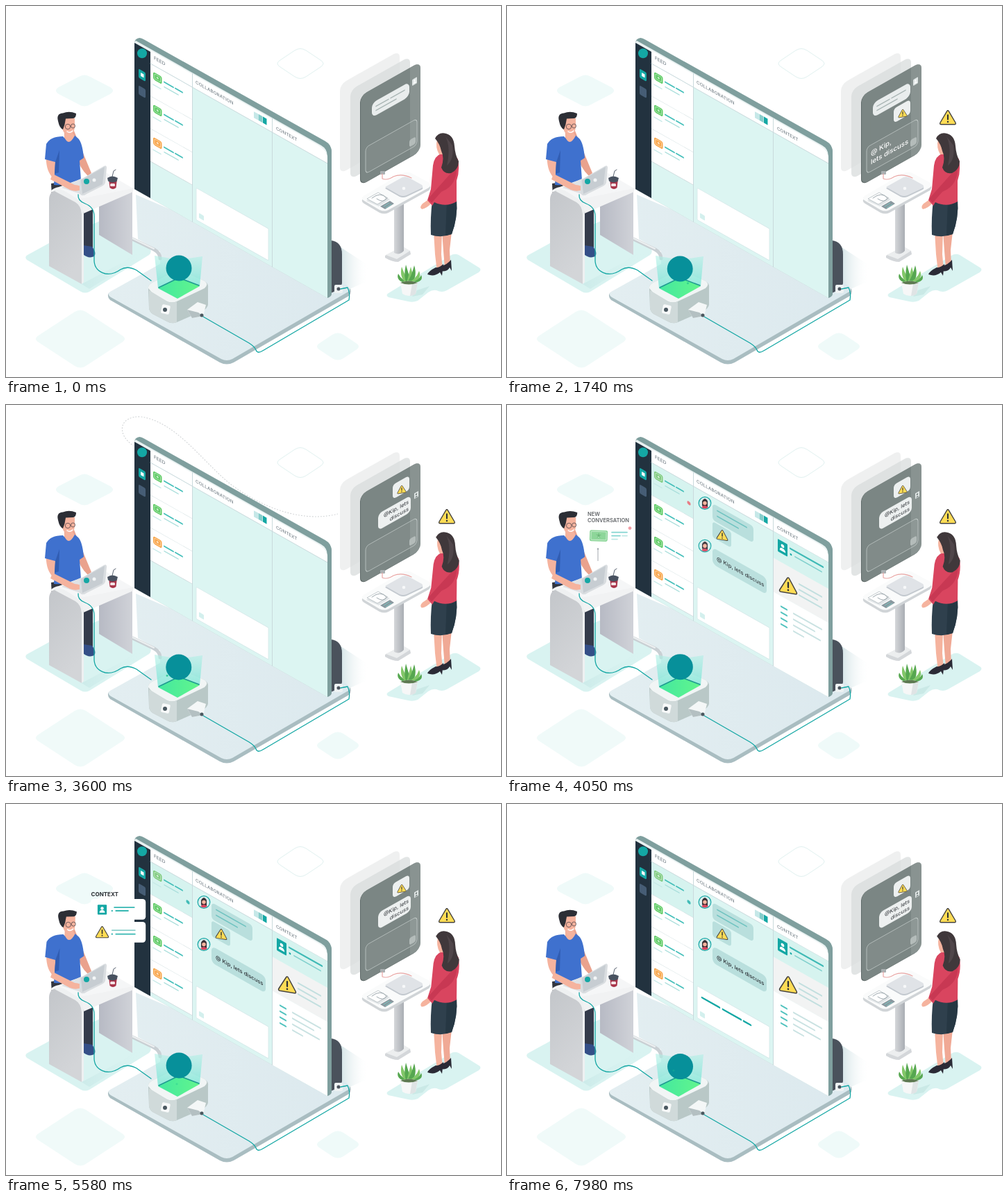
An HTML page that plays this animation: 713x535 px, repeating every 8 s.

```html
<!DOCTYPE html>
<html lang="en">
<head>
<meta charset="utf-8">
<title>Shared conversation</title>
<style>
html, body { margin: 0; width: 100%; height: 100%; overflow: hidden; background: #fff; }
svg { display: block; width: 100%; height: 100%; font-family: Inter, sans-serif; }
</style>
</head>
<body>
<svg id="stage" viewBox="0 0 713 535"></svg>
<script>
const DURATION = 8000;
const SLOPE = .565;
const TEAL = '#14a7a4', INK = '#2b2f34', SKIN = '#f5b39e';
const TRAIL = 'M478 157C430 170 370 150 322 113C280 78 245 25 195 17C163 15 158 42 184 59';

// Markup helpers
const path = (d, fill, extra = '') => `<path d="${d}" fill="${fill}" ${extra}/>`;
const line = (d, stroke, width, extra = '') =>
  `<path d="${d}" fill="none" stroke="${stroke}" stroke-width="${width}" stroke-linecap="round" stroke-linejoin="round" ${extra}/>`;
const rect = (x, y, w, h, fill, r = 0, extra = '') =>
  `<rect x="${x}" y="${y}" width="${w}" height="${h}" rx="${r}" fill="${fill}" ${extra}/>`;
const circle = (x, y, r, fill, extra = '') => `<circle cx="${x}" cy="${y}" r="${r}" fill="${fill}" ${extra}/>`;
const text = (x, y, size, fill, content, extra = '') =>
  `<text x="${x}" y="${y}" font-size="${size}" fill="${fill}" ${extra}>${content}</text>`;
const group = (id, content, extra = '') => `<g id="${id}" ${extra}>${content}</g>`;
const bar = (x, y, w, color = '#54c5c0', width = 2) => line(`M${x} ${y}h${w}`, color, width);
const gradient = (id, from, to, dir = 'x2="1" y2="0"') =>
  `<linearGradient id="${id}" ${dir}><stop stop-color="${from}"/><stop offset="1" stop-color="${to}"/></linearGradient>`;
const plane = (x, y, slope) => `transform="matrix(1 ${slope} 0 1 ${x} ${y})"`;

// "lean" counters part of the slope of the surface the sign lies on
const warning = (x, y, s = 1, lean = 0) => `<g transform="translate(${x} ${y}) scale(${s}) matrix(1 ${lean} 0 1 0 0)">
  <path d="M-1.4-9.2Q0-11.2 1.4-9.2L11 7.2Q12 9.6 9.6 9.8H-9.6Q-12 9.6-11 7.2Z" fill="#ffdc55" stroke="#45433f" stroke-width="1.4"/>
  ${line('M0-3.8V2.5', INK, 2)}${circle(0, 6, 1.2, INK)}</g>`;

const person = (x, y, w, h, fill = TEAL) => rect(x, y, w, h, fill, 1) +
  circle(x + w / 2, y + h * .36, w * .17, '#fff') +
  path(`M${x + w * .2} ${y + h * .8}q0 ${-h * .25} ${w * .3} ${-h * .25}t${w * .3} ${h * .25}z`, '#fff');

const portrait = (x, y) => `<g ${plane(x, y, -SLOPE)}>` +
  circle(0, 0, 8.8, '#d9eeee', `stroke="${TEAL}" stroke-width="1.2"`) +
  path('M-4 4v-7q4-7 8 0v9z', '#3a3035') + circle(0, 0, 2.8, SKIN) + path('M-5 6q5-5 10 0q-5 4-10 0', '#d9455f') + '</g>';

const note = (x, y, w, h, color) => rect(x, y, w, h, color, 2.5) +
  rect(x + 2, y + 2, w - 4, h - 4, 'none', 1, 'stroke="#ffffffa0" stroke-width=".8"') +
  circle(x + w / 2, y + h / 2, h * .14, '#ffffffa0');

const feedItem = (v, color, fill) => rect(23, v, 60.5, 47, fill) +
  line(`M23 ${v + 47}h60.5`, '#ccd9db', .8) + note(27, v + 9.5, 12.5, 11, color) +
  bar(43, v + 15.5, 13, '#45bfba', 2) + bar(59, v + 15.5, 10, '#45bfba', 2) +
  bar(27, v + 28, 11, '#c6e9e7', 1.5) + bar(43, v + 22.5, 20, '#a9dedb', 1.5);

const diamond = (cx, cy, w, h, fill, extra = '') => {
  const x = w / 2 - 8, y = h / 2 - 5;
  return path(`M${cx - x} ${cy - 5}L${cx - 8} ${cy - y}Q${cx} ${cy - h / 2} ${cx + 8} ${cy - y}L${cx + x} ${cy - 5}Q${cx + w / 2} ${cy} ${cx + x} ${cy + 5}L${cx + 8} ${cy + y}Q${cx} ${cy + h / 2} ${cx - 8} ${cy + y}L${cx - x} ${cy + 5}Q${cx - w / 2} ${cy} ${cx - x} ${cy - 5}Z`, fill, extra);
};

const defs = `<defs>
  ${gradient('legFront', '#c3c6ca', '#d3d5d8', 'x2=".4" y2="1"')}
  ${gradient('legBack', '#b7bac4', '#d0d2d8')}
  ${gradient('floor', '#e3eef1', '#dce9ee')}
  ${gradient('shade', '#a9c9ce', '#ffffff00')}
  ${gradient('deskShade', '#bfe3e2', '#d9f3f100')}
  ${gradient('beam', '#b4efe699', '#5fe3cfaa', 'x2="0" y2="1"')}
  ${gradient('glow', '#43e8a0', '#62f58c')}
  ${gradient('column', '#d5d7da', '#a9adb3')}
  <clipPath id="feedClip"><rect x="23" y="20" width="60.5" height="194"/></clipPath>
  <clipPath id="tabletClip"><rect width="86" height="129" rx="9"/></clipPath>
  <mask id="trail" maskUnits="userSpaceOnUse" x="0" y="0" width="713" height="535">
    <path id="trailReveal" d="${TRAIL}" pathLength="1" stroke="#fff" stroke-width="6" fill="none" stroke-dasharray="1 2"/>
  </mask>
</defs>`;

const ground = diamond(113, 122, 90, 50, '#effaf9') + diamond(107, 480, 136, 88, '#f0faf9') +
  diamond(478, 491, 68, 44, '#effaf9') + diamond(424, 83, 74, 48, 'none', 'stroke="#e0f1f0" stroke-width="1"') +
  path('M31 359L62 342L140 308L207 350Q211 354 206 359L120 412Q114 415 108 412L30 366Q26 362 31 359Z', '#d9f3f1') +
  path('M551 414L640 360Q646 356 652 359L681 377Q686 380 681 384L635 410Q628 414 620 410Q614 409 608 413L593 425Q586 428 579 426L551 420Q546 417 551 414Z', '#d9f3f1') +
  path('M470 340L522 374L518 398L484 413Z', 'url(#shade)', 'opacity=".85"');

const platform = path('M148 414Q145 419 150 424L308 514Q318 519 328 514L494 418Q498 414 496 408L470 395L350 330L230 368Z', '#a9bdc1') +
  path('M150 412Q145 416 151 420L310 509Q318 513 326 509L493 412Q498 408 490 402L187 272L190 336L222 354V372Z', 'url(#floor)') +
  line('M182 336L213 351Q222 356 222 364', '#c9d0d4', 5) + line('M182 335L213 350', '#eceff0', 2);

const screen = path('M468 338Q484 340 484 358V400Q483 408 468 414Z', '#4a525c') +
  path('M185 54Q185 47 192 46Q195 46 200 49L460 195Q469 200 469 210V415Q469 419 463 421L185 264Z', '#7f9f9e') +
  path('M185 52L187 50L454 201Q463 206 463 216V421L185 264Z', '#eaf2f2') +
  group('screen',
    rect(0, 3, 23, 211, '#22323f') + `<g ${plane(11, 12, -SLOPE)}>${circle(0, 0, 7, TEAL)}</g>` +
    rect(6, 37, 10, 13, TEAL, 2) + rect(9, 41, 4.5, 5, '#fff', .5) + rect(6, 61, 10, 13, '#465d75', 2) +
    rect(23, 1, 241, 19, '#fff') + path('M264 1q14 0 14 12v7h-14z', '#fff') +
    rect(23, 20, 255, 194, '#dcf5f2') +
    '<g clip-path="url(#feedClip)">' +
      group('feed', feedItem(-27, '#7fcb7f', '#d6f3ef') + feedItem(20, '#5fcb65', '#fff') +
        feedItem(67, '#5fcb65', '#fff') + feedItem(114, '#f8a64b', '#fff') + circle(77, 1, 2.6, TEAL, 'id="unread"')) + '</g>' +
    line('M23 20H278M83.5 0V214M198.5 0V214', '#c9d9dc', 1) +
    text(28, 11, 6.5, '#7a858c', 'FEED', 'font-weight="500"') +
    text(88, 12, 6.3, '#7a858c', 'COLLABORATION', 'font-weight="500" letter-spacing=".1"') +
    text(204, 13, 6.3, '#7a858c', 'CONTEXT', 'font-weight="500"') +
    rect(172, 5, 6, 9, '#c6e8e8') + rect(178.5, 5, 6, 9, '#85ccca') + rect(185, 5, 5.5, 9, TEAL) +
    rect(89, 162, 104, 46, '#fff', 1, 'stroke="#d4e8e9" stroke-width=".8"') + rect(93, 196, 7, 7, '#d4f0ee', 1) +
    group('reply', '') +
    group('firstMessage', portrait(100, 35) + rect(111, 29, 59, 24, '#b9dfdd', 5) + bar(118, 36, 42, '#6fc3c0', 1.8) + bar(118, 44, 30, '#6fc3c0', 1.8) +
      rect(111, 55, 27, 23, '#b9dfdd', 4) + warning(125, 67, .7, -.4)) +
    group('secondMessage', portrait(100, 96) + rect(111, 92, 78, 24, '#b9dfdd', 6) +
      text(117, 107, 7.6, INK, '@ Kip, lets discuss', 'font-weight="500"')) +
    group('details', rect(199, 20, 79, 38, '#d6f3ef') + rect(199, 58, 79, 49, '#f2f3f3') + rect(199, 107, 79, 107, '#fff') +
      person(205, 27, 14, 18) + bar(223, 31, 47, '#3fbab6', 2.4) + circle(224, 39, 1.4, TEAL) + bar(230, 39, 38, '#80d0cd', 1.8) +
      warning(220, 86, 1.1, -.4) + bar(236, 75, 32, '#c2dfdf', 2.2) + bar(236, 83, 26, '#c2dfdf', 2.2) + bar(236, 91, 32, '#c2dfdf', 2.2) +
      [0, 1, 2, 3].map(i => bar(210, 122 + i * 8.5, 8, '#50c2be', 2.2) + bar(228, 122 + i * 8.5, [40, 30, 38, 14][i], '#c9e2e2', 2.2)).join('')),
    plane(185, 50, SLOPE)) +
  path('M463 216Q463 206 455 201L460 197Q469 203 469 210V415L463 421Z', '#7f9f9e');

const device = path('M205 407Q204 402 212 398L242 383Q249 380 256 383L285 396Q292 400 291 406V431Q290 436 283 440L246 456Q239 459 232 455L211 444Q206 440 206 435Z', '#b9c8c7') +
  path('M205 407Q204 402 212 398L242 383Q249 380 256 383L285 396Q293 401 286 407L246 426Q239 429 232 426L210 413Z', '#f1f5f5') +
  path('M206 410L232 426Q239 429 246 426V456Q239 459 232 455L211 444Q206 440 206 435Z', '#d0dada') +
  path('M219 407L249 391L279 404L247 422Z', 'url(#glow)') +
  path('M214 360L249 366L283 361L279 404L249 392L219 407Z', 'url(#beam)') +
  line('M220 406L249 392L278 403', '#1d9a90', 1.5) + line('M249 367V392', '#81d9cd', .7) +
  circle(249, 378, 18.5, '#07909a', 'id="token"') + circle(0, 0, 1.5, '#25c890', 'id="spark"') +
  rect(224, 431, 12, 13, '#f7f9f9', 2, 'transform="rotate(12 230 437)"') + circle(229, 438, 3, '#4a5860') +
  path('M261 438L276 427L288 431L284 447L268 450Z', '#f4f7f7') + path('M261 438L277 442L284 447L268 450Z', '#b4c0c2') + circle(282, 446, 2.5, '#4c5960');

const cables = rect(473, 402, 12, 12, '#eef2f3', 2) + circle(479, 408, 2.5, '#4a525c') +
  line('M482 408L492 406Q496 414 494 424L370 497Q362 502 360 496Q358 491 350 486L284 448', TEAL, 1.3);

const man = path('M110 293H125V350L112 353Z', '#343b4b') + path('M111 345L124 347Q131 356 127 361Q119 365 111 358Z', '#344f87') +
  path('M134 263L182 265V359L134 330Z', 'url(#legBack)') +
  path('M65 256L106 250L109 278L66 275Z', '#33363f') +
  '<g transform="translate(2 0)">' +
  group('manBody',
    path('M82 177V192Q90 202 100 190L96 180Z', '#eda58f') +
    path('M56 212Q54 238 67 249L98 263L103 257L75 239L77 218Z', SKIN) + path('M99 215Q104 234 116 245L121 241L109 212Z', '#eaa28d') +
    path('M80 188Q62 188 56 199L54 221L69 225L67 258Q86 260 106 251L104 223L110 219Q108 197 102 191L96 186Q91 201 80 188Z', '#3f71ce') +
    path('M69 225L75 208L74 240L68 242Z', '#315db2') + path('M82 189Q88 204 97 187L94 184H83Z', SKIN) +
    path('M78 165Q77 182 87 187Q96 187 97 174V162L82 159Z', SKIN) +
    path('M73 166Q70 155 80 154.5Q89 151 99 155Q99 161 95 162L84 162.5Q83 171 80 178Q75 176 73 166Z', '#2c2e35') +
    circle(87, 174, 3.7, 'none', 'stroke="#51454a" stroke-width=".8"') + circle(94.5, 173, 3, 'none', 'stroke="#51454a" stroke-width=".8"') +
    line('M86 181Q90 184 94 180', '#fff', 1.5)) + '</g>' +
  path('M64 267Q69 262 76 261L140 238L183 263L112 297Z', '#f5f6f7') +
  path('M62 282Q61 265 76 266L102 283Q110 288 109 300V401L62 375Z', 'url(#legFront)') +
  path('M76 264Q82 264 102 278Q113 286 112 300V398L109 401V300Q108 288 100 283L70 267Z', '#eef0f1') +
  path('M112 299Q112 286 102 279L183 263V268Z', '#f1f2f3') +
  path('M109 401L171 368L182 359L206 354L120 408Z', 'url(#deskShade)', 'opacity=".5"') +
  path('M80 262L108 249L142 253L113 273Z', '#dfe2e5') +
  group('hands', path('M67 242L99 258Q108 258 110 264Q102 269 92 265L64 250Z', SKIN)) +
  path('M106 251L141 231Q145 229 145 233L143 255Q142 258 138 260L112 273Q107 274 106 269Z', '#d9dde0') +
  path('M108 251L142 232L139 257L110 271Z', '#c7cdd2') + circle(116, 253, 4, TEAL) + circle(127, 251, 2.5, '#f3f6f7') +
  path('M148 250L160 249L158.5 262Q154 266 149.5 262Z', '#a9364b') + path('M146 248Q153 243 161 248L159.5 253Q153 256 147 252.5Z', '#485260') +
  rect(150, 256, 7, 4, '#f3e3e5', 1.5) + line('M153 246L155 238L158 236', '#596370', 1) +
  line('M104 272Q103 281 114 285Q127 290 127 303V368Q128 382 143 386Q154 388 165 380Q175 374 188 381L209 396', TEAL, 1.3);

const tablet =
  rect(0, 0, 86, 129, '#eeefef', 9, `opacity=".9" ${plane(481, 113, -SLOPE)}`) +
  rect(0, 0, 86, 129, '#d9dddc', 9, `opacity=".75" ${plane(496, 121, -SLOPE)}`) +
  rect(0, 0, 86, 129, '#5e6968', 9, plane(510, 130, -SLOPE)) +
  `<g ${plane(511, 129, -SLOPE)}>` +
    rect(0, 0, 86, 129, '#818b89', 9) +
    '<g clip-path="url(#tabletClip)"><path d="M0 0H71V129H0Z" fill="#6f7a78" opacity=".3"/><path d="M71 0H86V129H71Z" fill="#929b99" opacity=".5"/></g>' +
    group('oldMessage', rect(16, 20, 54, 21, '#e9eded', 7) + bar(22, 28, 18, '#a6b3b2', 1.5) + bar(43, 28, 20, '#a6b3b2', 1.5) + bar(22, 34, 29, '#a6b3b2', 1.5) +
      person(74, 19, 7, 9, '#dfe5e4')) +
    group('alertMessage', rect(46, 45, 24, 21, '#edf0f0', 5) + warning(59, 59, .55, .4)) +
    group('sentMessage', rect(25, 42, 47, 24, '#edf0f0', 6) +
      text(69, 52, 7.6, INK, '@Kip, lets', 'text-anchor="end"') + text(69, 62, 7.6, INK, 'discuss', 'text-anchor="end"') +
      path('M77 42h6v8h-6z', '#dfe5e4') + circle(80, 45, 1.2, '#6f7a78') + path('M78 49q2-3 4 0z', '#6f7a78')) +
    rect(7, 79, 74, 38, '#ffffff0b', 5, 'stroke="#c1c9c7" stroke-width=".8"') + rect(70, 104, 9, 10, '#b4bcba', 2.5) +
    text(13, 94, 9.6, '#fff', '', 'id="typedTop" font-weight="500"') + text(13, 107, 9.6, '#fff', '', 'id="typedBottom" font-weight="500"') +
  '</g>';

const table = path('M546 360L563 351L582 353L583 358L565 369Q556 369 546 363Z', '#d4d7da') + path('M547 359L572 347L582 353L563 365Z', '#eceeef') +
  path('M559 285L573 278V353Q567 360 559 356Z', 'url(#column)') +
  path('M515 277Q510 281 516 285L538 298Q545 301 551 298L609 266Q614 261 608 257L582 243Z', '#d0d4d7') +
  path('M515 274Q510 278 516 281L538 294Q545 297 551 294L609 262Q613 258 608 254L582 240Q574 238 566 244Z', '#fafbfb') +
  path('M546 263L571 249Q576 247 581 250L599 260Q602 263 598 265L577 275Q572 277 567 275Z', '#c2c8ce') +
  path('M546 261L571 247Q576 245 581 248L599 258Q602 261 598 263L577 273Q572 275 567 273Z', '#e0e3e7') + circle(573, 263, 2.3, '#f7f8f9') +
  path('M519 281L536 270L553 279L537 289Z', '#e1e5e7') + path('M520 278L536 269L550 277L535 286Z', '#fff', 'stroke="#aab3b8" stroke-width=".7"') +
  path('M539 289L553 281L559 285L546 293Z', '#8a979e') + line('M544 289L552 284M547 291L555 286', '#7ac9c3', 1) +
  line('M527 277Q540 267 548 277Q544 285 534 278', '#9ca7ad', 1) +
  rect(539, 238, 7, 5, '#aab0b2', 1) + line('M542 242V249Q549 252 558 246Q570 241 584 248', '#e9a5a3', 1.2);

const leaves = [[-15, -21], [-10, -31], [-4, -34], [3, -31], [8, -33], [15, -25], [18, -19]]
  .map(([x, y], i) => path(`M-3-7Q${x - 4} ${y / 2} ${x} ${y}Q${x + 5} ${y / 2} 4-7Z`, i % 2 ? '#82c768' : '#56a750')).join('');
const plant = `<g transform="translate(580 407)">${path('M12 3L30-3L20 9L5 12Z', '#bfe3e0', 'opacity=".6"')}${leaves}
  ${path('M-12-8Q0-13 13-8L10 8Q0 14-9 8Z', '#f6f7f7')}${path('M5-6L13-8L10 8Q7 11 2 11Z', '#dfe4e5')}${path('M-12-8Q0-3 13-8Q0-13-12-8Z', '#5d7951')}</g>`;

const woman = path('M616 325H628L627 358L629 380L621 384L618 358Z', SKIN) + path('M628 325H642L639 352L640 375L632 378L630 353Z', '#f0a995') +
  path('M619 377Q624 378 630 372L628 389L625 384Q617 391 607 387Q609 382 619 377Z', '#2b2b36') +
  path('M629 374Q635 373 641 366L642 382L639 377Q636 384 626 382Z', '#2b2b36') +
  path('M614 280L649 279Q651 305 642 329Q627 335 612 330Q611 306 614 280Z', '#2f404d') + path('M635 281L649 279Q651 305 642 329L633 331Z', '#263743') +
  group('womanBody',
    path('M610 278L600 285Q595 290 599 293Q606 292 613 284Z', SKIN) +
    path('M627 213Q617 216 615 230L612 264L607 280L614 288L617 283Q634 291 649 282V252Q654 238 651 221Q647 214 638 212Z', '#d9455f') +
    path('M649 232Q650 259 627 268L613 284L608 278L623 261L640 242Z', '#c83853') +
    path('M621 192Q618 204 624 214L635 214L638 190Z', SKIN) +
    path('M618 191Q623 181 634 184Q645 187 646 202Q647 215 652 224Q652 236 641 241Q631 243 627 233Q632 219 627 209Q625 199 618 191Z', '#40383b') +
    path('M633 188Q641 204 635 230Q646 221 643 201Z', '#50464a'));

const newConversation = group('newConversation',
  text(116, 158.5, 7.5, INK, 'NEW', 'font-weight="600"') + text(116, 167, 7.5, INK, 'CONVERSATION', 'font-weight="600"') +
  `<g transform="rotate(2 132 187)">${note(119, 179, 26, 16, '#67c977')}${text(132, 190, 9, '#39a24b', '★', 'text-anchor="middle"')}</g>` +
  bar(151, 182, 22, '#58c6c1', 1.7) + bar(151, 187, 12, '#58c6c1', 1.7) + bar(166, 187, 7, '#a9dfdc', 1.7) + bar(151, 192, 8, '#a9dfdc', 1.7) +
  circle(177, 176, 2.4, '#ee7b87') + line('M131 206V223', '#818a91', 1) + circle(131, 206, 1.2, '#818a91'));

const contextCards = group('contextCards',
  text(.5, -4, 7.3, INK, 'CONTEXT', 'font-weight="700"') +
  rect(0, 0, 72, 27, '#fff', 4, 'class="card"') + rect(0, 30, 72, 27, '#fff', 4, 'class="card"') +
  person(9, 7.5, 12, 13) + bar(31, 11, 26, '#36b7b2', 1.7) + circle(28, 15.5, 1, TEAL) + bar(33, 15.5, 16, '#36b7b2', 1.7) +
  warning(15, 43.5, .73) + bar(28, 41, 30, '#8acfcc', 1.7) + circle(28, 46, 1, TEAL) + bar(33, 46, 25, '#36b7b2', 1.7));

const trail = line(TRAIL, '#d0d3d5', 1.1, 'id="dots" stroke-dasharray="1 3" mask="url(#trail)"');

const stage = document.getElementById('stage');
stage.innerHTML = defs + ground + platform + trail + screen + man + cables + device + tablet + table + plant + woman +
  group('alert', warning(0, 0)) + newConversation + contextCards;

const part = Object.fromEntries([...stage.querySelectorAll('[id]')].map(node => [node.id, node]));
const cards = stage.querySelectorAll('.card');
const set = (id, attributes) => Object.entries(attributes).forEach(([key, value]) => part[id].setAttribute(key, value));
const mix = (a, b, k) => a + (b - a) * k;
const linear = (t, a, b) => Math.min(1, Math.max(0, (t - a) / (b - a)));
const ease = (t, a, b) => { const k = linear(t, a, b); return k * k * (3 - 2 * k); };
const shift = (x, y) => `translate(${x} ${y})`;

function typeMessage(t) {
  const message = '@ Kip,|lets discuss';
  const count = t < 2050 ? Math.floor(linear(t, 800, 1620) * message.length) : 0;
  const [top, bottom = ''] = message.slice(0, count).split('|');
  part.typedTop.textContent = top;
  part.typedBottom.textContent = bottom;
}

function renderContext(t) {
  const enter = ease(t, 5100, 5450), settle = ease(t, 5700, 6480), leave = linear(t, 6500, 7280) ** 2;
  const x = mix(mix(145, 122, enter), 83, leave);
  const scale = mix(mix(.8, 1.1, enter), .8, leave);
  set('contextCards', {
    transform: `${shift(x, mix(137, 143, leave))} scale(${scale})`,
    opacity: enter * (1 - ease(t, 6980, 7280))
  });
  const gray = Math.round(mix(255, 207, settle));
  cards.forEach(card => card.setAttribute('fill', `rgb(${gray},${gray + 2 * settle},${gray + 3 * settle})`));
}

function renderReply(t) {
  const typed = linear(t, 7320, 7920) * 74;
  part.reply.innerHTML = [[96, 25], [126, 26], [156, 10]].map(([x, width]) => {
    const visible = Math.min(width, Math.max(0, typed - (x - 96)));
    return visible ? bar(x, 175, visible, TEAL, 2.6) : '';
  }).join('');
}

function render(t) {
  set('token', { cx: 249 + .8 * Math.sin(t / 600), cy: 378 + Math.sin(t / 1150) });
  const rise = t % 1350 / 1350;
  set('spark', { cx: 249 + 17 * Math.sin(Math.floor(t / 1350) * 2.4), cy: 407 - 25 * rise, opacity: Math.sin(rise * Math.PI) });

  // Tablet conversation
  const pop = ease(t, 250, 550), scroll = ease(t, 2000, 2400);
  set('alert', { transform: `${shift(635, 161)} scale(${pop * (1 + .12 * Math.sin(linear(t, 450, 700) * Math.PI))})`, opacity: pop });
  set('oldMessage', { transform: shift(0, -33 * scroll), opacity: 1 - scroll });
  set('alertMessage', { transform: shift(0, -33 * scroll + 7 * (1 - pop)), opacity: pop });
  set('sentMessage', { transform: shift(0, 30 * (1 - scroll)), opacity: scroll });
  typeMessage(t);

  set('trailReveal', { 'stroke-dashoffset': 1 - ease(t, 2460, 3240) });
  set('dots', { opacity: 1 - ease(t, 3650, 3980) });

  // Main screen
  const arrival = ease(t, 3650, 4020);
  set('feed', { transform: shift(0, 47 * arrival) });
  set('unread', { fill: t < 5100 ? '#e87d86' : '#43bcb7', opacity: arrival });
  [['firstMessage', 3650], ['secondMessage', 3800], ['details', 3750]].forEach(([id, start]) => {
    const k = ease(t, start, start + 300);
    set(id, { opacity: k, transform: shift(0, id === 'details' ? 0 : 9 * (1 - k)) });
  });
  const notice = ease(t, 3850, 4150);
  set('newConversation', { opacity: notice * (1 - ease(t, 5000, 5180)), transform: shift(0, 6 * (1 - notice)) });
  renderContext(t);
  renderReply(t);

  // Gentle body movement
  set('womanBody', { transform: `rotate(${.7 * ease(t, 1700, 2400)} 630 285)` });
  const typing = linear(t, 7300, 7400);
  set('hands', { transform: shift(typing * Math.sin(t / 55), typing * .8 * Math.cos(t / 55)) });
  set('manBody', { transform: `rotate(${.5 * ease(t, 3900, 4300) * (1 - ease(t, 7300, 7600))} 80 255)` });
}

function tick(now) {
  render(now % DURATION);
  requestAnimationFrame(tick);
}
render(0);
requestAnimationFrame(tick);
</script>
</body>
</html>
```
